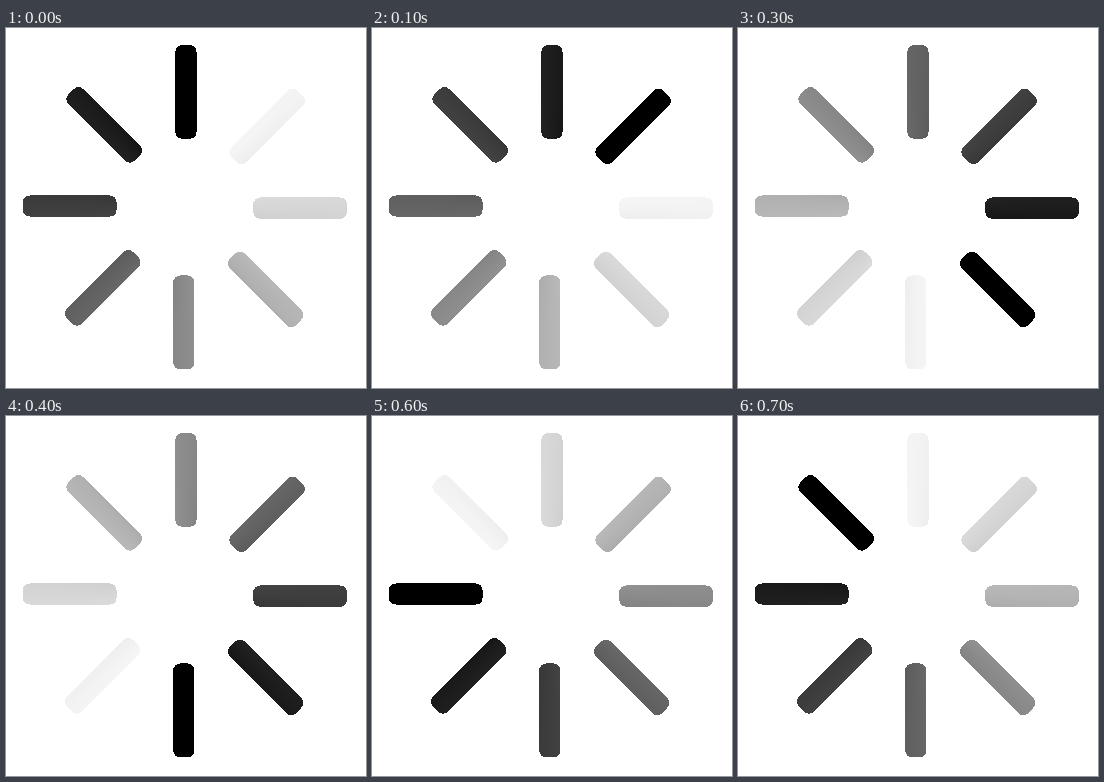
An HTML page with a canvas for the animation above (800 ms loop, 360 px wide and 360 px high).

```html
<!DOCTYPE html>
<html lang="en">
<head>
<meta charset="utf-8">
<title>Spinner</title>
<style>
  html, body { margin: 0; width: 100%; height: 100%; overflow: hidden; background: #fff; }
  canvas { display: block; width: 360px; height: 360px; }
</style>
</head>
<body>
<canvas id="stage" width="360" height="360"></canvas>
<script>
const SIZE = 360, BARS = 8, STEP_MS = 100;
const CENTER = { x: 178.9, y: 179.1 };
const BAR = { x: -9.5, y: -162, w: 21.1, h: 93.6, r: 6.6 };
// Grey level at each bar, counted anticlockwise from the darkest one
const GREYS = [0, 29, 62, 99, 139, 180, 214, 243];

const ctx = document.getElementById('stage').getContext('2d');
const mask = makeMask();

// All bars as one shape with hard, unsmoothed edges
function makeMask() {
  const canvas = document.createElement('canvas');
  canvas.width = canvas.height = SIZE;
  const pen = canvas.getContext('2d');
  pen.translate(CENTER.x, CENTER.y);
  for (let i = 0; i < BARS; i++) {
    pen.beginPath();
    pen.roundRect(BAR.x, BAR.y, BAR.w, BAR.h, BAR.r);
    pen.fill();
    pen.rotate(2 * Math.PI / BARS);
  }
  const image = pen.getImageData(0, 0, SIZE, SIZE);
  for (let i = 3; i < image.data.length; i += 4) {
    image.data[i] = image.data[i] > 127 ? 255 : 0;
  }
  pen.putImageData(image, 0, 0);
  return canvas;
}

// Sweep whose white-to-black seam lies in the gap after the darkest bar
function sweep(head) {
  const slice = 2 * Math.PI / BARS;
  const gradient = ctx.createConicGradient(
    (head + 0.5) * slice - Math.PI / 2, CENTER.x, CENTER.y);
  const stop = (k, grey) =>
    gradient.addColorStop(1 - (k + 0.5) / BARS, `rgb(${grey},${grey},${grey})`);
  stop(-0.5, 0);
  stop(0.2, 0);
  GREYS.slice(1).forEach((grey, i) => stop(i + 1, grey));
  stop(7.5, 252);
  return gradient;
}

function draw(ms) {
  const head = Math.floor(ms / STEP_MS) % BARS;
  ctx.globalCompositeOperation = 'copy';
  ctx.drawImage(mask, 0, 0);
  ctx.globalCompositeOperation = 'source-in';
  ctx.fillStyle = sweep(head);
  ctx.fillRect(0, 0, SIZE, SIZE);
}

const start = performance.now();
function tick() {
  draw(performance.now() - start);
  requestAnimationFrame(tick);
}
tick();
</script>
</body>
</html>
```
